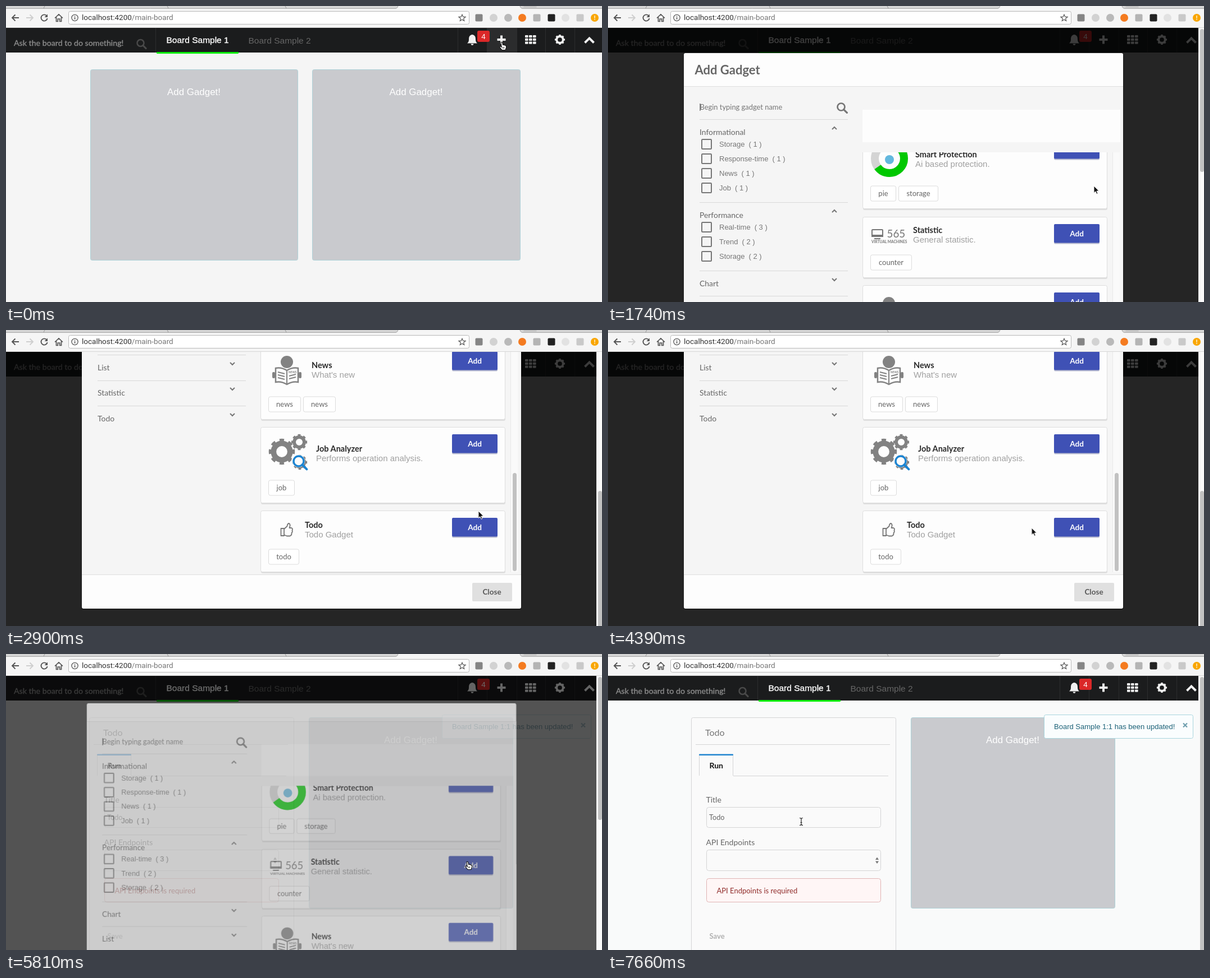
Write an HTML page that moves like this. It is 1061x528 px and loops after 8 s.

```html
<!DOCTYPE html>
<html lang="en">
<head>
<meta charset="utf-8">
<title>Add a gadget to the board</title>
<style>
html, body { margin: 0; width: 100%; height: 100%; overflow: hidden; background: #f5f5f5; }
svg { display: block; width: 1061px; height: 528px; font-family: Lato, "Open Sans", sans-serif; }
text { white-space: pre; }
.helv { font-family: "Liberation Sans", Arial, sans-serif; }
.url { font-family: Roboto, sans-serif; }
.bold { font-weight: 700; }
.mid { text-anchor: middle; }
.semi { stroke: currentColor; stroke-width: .35px; }

.anim { animation: 8s linear infinite; }
.step { animation: 8s step-end infinite; }
.dimmer { animation-name: dim; }
.modal { animation-name: modal; }
.scroll { animation-name: scroll; }
.thumb { animation-name: thumb; }
.body { animation-name: body; }
.before { animation-name: before; }
.after { animation-name: after; }
.hover { animation-name: hover; }
.bar { animation-name: bar; }
.short { animation-name: short; }
.long { animation-name: long; }
.toast { animation-name: toast; }
.cursor { animation-name: move; }
.arrow { animation-name: arrow; }
.hand { animation-name: hand; }
.ibeam { animation-name: ibeam; }

@keyframes dim {
  0%, 8.9% { opacity: 0; }
  13.375% { opacity: .57; }
  16.25%, 70.25% { opacity: 1; }
  72.625% { opacity: .79; }
  78.2%, 100% { opacity: 0; }
}
@keyframes modal {
  0%, 8.9% { opacity: 0; transform: scale(.8); transform-origin: 526px 303px; }
  13.375% { opacity: .45; transform: scale(.927); transform-origin: 526px 303px; }
  17.5% { opacity: 1; transform: none; transform-origin: 526px 303px; }
  70.25% { opacity: 1; transform: scale(1); transform-origin: 526px 264px; }
  72.625% { opacity: .75; transform: scale(.978); transform-origin: 526px 264px; }
  76.4%, 100% { opacity: 0; transform: scale(.9); transform-origin: 526px 264px; }
}
@keyframes scroll {
  0% { transform: translateY(0); }
  23.75% { transform: translateY(0); animation-timing-function: ease-in-out; }
  35.5%, 66.86% { transform: translateY(-473px); }
  66.88%, 100% { transform: translateY(0); }
}
@keyframes thumb {
  0% { transform: translateY(0); }
  23.75% { transform: translateY(0); animation-timing-function: ease-in-out; }
  35.5%, 66.86% { transform: translateY(246px); }
  66.88%, 100% { transform: translateY(0); }
}
@keyframes body { 0% { transform: none; } 66.87%, 100% { transform: translateY(-26.5px); } }
@keyframes before { 0% { opacity: 1; } 66.87%, 100% { opacity: 0; } }
@keyframes after { 0% { opacity: 0; } 66.87%, 100% { opacity: 1; } }
@keyframes hover { 0% { opacity: 1; } 8.9%, 100% { opacity: 0; } }
@keyframes bar { 0% { opacity: 0; } 8.9%, 100% { opacity: 1; } }
@keyframes short { 0% { opacity: 1; } 77.1%, 100% { opacity: 0; } }
@keyframes long { 0% { opacity: 0; } 77.1%, 100% { opacity: 1; } }
@keyframes toast { 0%, 70.25% { opacity: 0; } 72.625% { opacity: .5; } 78%, 100% { opacity: 1; } }
@keyframes move {
  0%, 8% { transform: translate(882px, 64px); }
  9%, 14.9% { transform: translate(883px, 65px); }
  20.6%, 25% { transform: translate(865px, 321px); }
  36%, 38.5% { transform: translate(841px, 323px); }
  40.75%, 44% { transform: translate(841px, 337px); }
  49.4%, 51.6% { transform: translate(686px, 372px); }
  54.875% { transform: translate(754px, 353px); }
  61.4%, 66.87% { transform: translate(821px, 358px); }
  70%, 74% { transform: translate(821px, 370px); }
  83.75%, 87.1% { transform: translate(384px, 335px); }
  95.75%, 100% { transform: translate(344px, 299px); }
}
@keyframes arrow {
  0% { opacity: 0; } 8.9% { opacity: 1; } 40.5% { opacity: 0; } 45.6% { opacity: 1; }
  58.8% { opacity: 0; } 74.5% { opacity: 1; } 93%, 100% { opacity: 0; }
}
@keyframes hand {
  0% { opacity: 1; } 8.9% { opacity: 0; } 40.5% { opacity: 1; } 45.6% { opacity: 0; }
  58.8% { opacity: 1; } 74.5%, 100% { opacity: 0; }
}
@keyframes ibeam { 0% { opacity: 0; } 93%, 100% { opacity: 1; } }
</style>
</head>
<body>
<svg id="stage" viewBox="0 0 1061 528"></svg>
<script>
const GRAY = '#767676';

// y is the vertical centre of the line
const text = (s, x, y, size, fill, cls = '') =>
  `<text x="${x}" y="${y + size * .35}" font-size="${size}" fill="${fill}" color="${fill}" class="${cls}">${s}</text>`;
const rect = (x, y, w, h, fill, extra = '') =>
  `<rect x="${x}" y="${y}" width="${w}" height="${h}" fill="${fill}" ${extra}/>`;
const box = (x, y, w, h, fill, stroke, r = 3) =>
  rect(x + .5, y + .5, w - 1, h - 1, fill, `stroke="${stroke}" rx="${r}"`);
const circle = (x, y, r, fill, extra = '') => `<circle cx="${x}" cy="${y}" r="${r}" fill="${fill}" ${extra}/>`;
const line = (d, stroke, w = 1, extra = '') =>
  `<path d="${d}" fill="none" stroke="${stroke}" stroke-width="${w}" ${extra}/>`;
const shape = (d, fill, extra = '') => `<path d="${d}" fill="${fill}" ${extra}/>`;
const group = (cls, ...parts) => `<g class="${cls}">${parts.join('')}</g>`;
const rule = (x1, x2, y, color) => rect(x1, y, x2 - x1, 1, color);
const chevron = (x, y, dir, r = 4, w = 2, color = GRAY) =>
  line(`M${x - r} ${y + dir * r / 2}l${r} ${-dir * r} ${r} ${dir * r}`, color, w);
const lens = (x, y, r, w, color) =>
  circle(x, y, r, 'none', `stroke="${color}" stroke-width="${w}"`) +
  line(`M${x + r * .7} ${y + r * .7}l${r * .9} ${r * .9}`, color, w * 1.2, 'stroke-linecap="round"');
const gear = (x, y, r, color) =>
  circle(x, y, r * .64, 'none', `stroke="${color}" stroke-width="${r * .42}"`) +
  circle(x, y, r * .88, 'none', `stroke="${color}" stroke-width="${r * .26}" pathLength="16" stroke-dasharray="1" stroke-dashoffset=".5"`);

function browser() {
  const extensions = [[842, '#858585'], [868, '#d2d2d2'], [894, '#b9b9b9'], [919, '#f47b20'], [945, '#b4b4b4'],
    [971, '#222'], [996, '#e2e2e2'], [1022, '#c9c9c9'], [1048, '#f9a602']];
  const squares = [842, 945, 971, 1022];
  return [
    rect(0, 0, 1061, 39, '#f5f5f5'),
    shape('M0 0H698L695 4.5H0Z', '#d5d5d5'),
    shape('M915 0H1061V4.5H918Z', '#d5d5d5'),
    line('M0 4.5H694Q697 4 698 0M915 0Q916 4.5 920 4.5H1061', '#a5a5a5'),
    line('M69 0l-2 4M287 0l2 4M497 0l2 4', '#999'),
    rect(921, 0, 24, 3, '#c4c4c4', 'rx="2"'),
    rect(0, 38, 1061, 1, '#d6d6d6'),
    line('M23 21H11M16.5 15.5L11 21l5.5 5.5', '#555', 1.9),
    line('M36 21H48M42.5 15.5L48 21l-5.5 5.5', '#cfcfcf', 1.9),
    line('M72.5 17.5A5.6 5.6 0 1 0 73.6 22', '#555', 1.9),
    shape('M74 14.5V20H68.5Z', '#555'),
    line('M87 21.5L94 15l7 6.5M89.5 20V27.5H92.3V23H95.7V27.5H98.5V20', '#555', 1.7),
    box(111, 9, 714, 24, '#fff', '#b8b8b8'),
    circle(122.5, 21, 5.6, 'none', 'stroke="#555" stroke-width="1.3"'),
    rect(121.8, 20, 1.5, 4, '#555'), rect(121.8, 17.6, 1.5, 1.5, '#555'),
    text('localhost:4200<tspan fill="#777">/main-board</tspan>', 135, 20.5, 13.5, '#333', 'url'),
    line('M812 15.2l1.7 4 4.3.3-3.3 2.8 1 4.3-3.7-2.3-3.7 2.3 1-4.3-3.3-2.8 4.3-.3Z', '#555', 1.2),
    ...extensions.map(([x, c]) => squares.includes(x) ? rect(x - 6.5, 14.5, 13, 13, c, 'rx="2"') : circle(x, 21, 7, c)),
    text('!', 1048, 21, 11, '#fff', 'bold mid')
  ].join('');
}

function header() {
  const icon = '#f0f0f0';
  const cells = [0, 1, 2].flatMap(r => [0, 1, 2].map(c => rect(924 + c * 7, 52 + r * 5.7, 5.6, 4.3, icon, 'rx=".8"')));
  return [
    rect(0, 39, 1061, 44, '#1b1c1d'),
    group('step hover', rect(857, 39, 52, 44, '#2b2c2d')),
    ...[266, 804, 856, 909, 960, 1012].map(x => rect(x, 39, 1, 44, '#2c2d2e')),
    text('Ask the board to do something!', 14, 66.5, 14.2, '#8b8b8b', 'semi'),
    lens(239.5, 66, 6, 2.5, '#494949'),
    text('Board Sample 1', 285.5, 61, 15.5, '#fff', 'helv semi'),
    text('Board Sample 2', 431.5, 61.5, 15.5, '#666', 'helv'),
    rect(268, 82, 146, 3, '#00f000', 'rx="1"'),
    shape('M830 51C824 52 824 57 824 60Q824 64 821 66.500H839Q836 64 836 60C836 57 836 52 830 51ZM827.500 67.500H832.500Q832 70 830 70T827.500 67.500Z', icon),
    rect(839, 44, 22, 20, '#db2828', 'rx="3"'),
    text('4', 850, 54, 13.5, '#fff', 'helv mid'),
    line('M874.500 60H889.500M882 52.500V67.500', icon, 4),
    ...cells,
    gear(986, 60, 9, icon),
    chevron(1038.500, 61.500, 1, 8, 4, icon)
  ].join('');
}

const slot = (x, w, cx) =>
  box(x, 113, w, 341, '#c9cace', '#aed2d8') + text('Add Gadget!', cx, 153, 16.9, '#fff', 'helv mid');

function todoCard() {
  return [
    rect(0, 83, 1061, 445, '#f9fafa'),
    box(148, 113, 365, 440, '#fafafa', '#d4d5d6'),
    text('Todo', 173, 140, 16, '#777'),
    rule(156, 502, 161, '#d4d4d5'),
    rule(223, 499, 217, '#d4d4d5'),
    line('M162.500 217V180H222.500V217', '#d4d4d5'),
    rect(162, 178.500, 61, 2.5, '#2185d0', 'rx="1"'),
    text('Run', 180.500, 199, 14, '#111', 'bold'),
    text('Title', 174.500, 260.500, 14, '#666'),
    box(175, 273, 311, 37, '#fafafa', '#d4d4d5', 4),
    text('Todo', 180, 291.500, 12.7, '#666'),
    text('API Endpoints', 174.500, 336, 14, '#666'),
    box(175, 349, 311, 38, '#fafafa', '#d4d4d5', 4),
    shape('M476 367l3-4.500 3 4.500ZM476 369.500l3 4.500 3-4.500Z', '#777'),
    box(175, 400, 311, 43, '#fff6f6', '#e0b4b4', 4),
    text('API Endpoints is required', 193.500, 422, 13, '#912d2b'),
    text('Save', 180.500, 503, 13, '#b0b0b0', 'bold'),
    slot(539, 364, 720.500)
  ].join('');
}

function toast() {
  return group('anim toast',
    box(776, 108, 266, 43, '#fafdfe', '#a9d5de'),
    text('Board Sample 1:1 has been updated!', 794, 129, 13, '#1c6278', 'helv'),
    line('M1024 123.500l7 7m0-7l-7 7', '#6f9fae', 2.2));
}

function filters() {
  const option = (y, name, count) =>
    box(166, y - 9, 19, 19, 'none', GRAY, 1) + rect(167.500, y - 7.500, 16, 16, 'none', `stroke="${GRAY}"`) +
    text(`${name}<tspan dx="7">( ${count} )</tspan>`, 198, y + .5, 13, '#777', 'helv');
  const section = (y, name, dir) => text(name, 163, y, 13.9, '#666') + chevron(403, y - 7, dir);
  return [
    text('Begin typing gadget name', 163.500, 180.500, 12.9, GRAY),
    rect(163.500, 174, 1, 13, '#333'),
    lens(415, 180, 6.5, 2.7, GRAY),
    ...[202, 350, 472, 517, 563, 608].map(y => rule(163, 427, y, '#d8d8d8')),
    section(225, 'Informational', 1),
    option(246, 'Storage', 1), option(272, 'Response-time', 1), option(298, 'News', 1), option(324, 'Job', 1),
    section(373, 'Performance', 1),
    option(394, 'Real-time', 3), option(420, 'Trend', 2), option(446, 'Storage', 2),
    section(495, 'Chart', -1), section(540, 'List', -1), section(585, 'Statistic', -1), section(631, 'Todo', -1)
  ].join('');
}

const icons = {
  donut: () =>
    circle(501, 272, 26, 'none', 'stroke="#d4d4d4" stroke-width="14"') +
    circle(501, 272, 26, 'none', 'stroke="#00c800" stroke-width="14" pathLength="100" stroke-dasharray="65 35" transform="rotate(-90 501 272)"') +
    circle(501, 274, 8, '#63b8de'),
  monitor: () =>
    rect(470, 399, 19, 12, 'none', `stroke="${GRAY}" stroke-width="2" rx="1"`) + rect(469, 408, 21, 4, GRAY) +
    rect(474, 414, 11, 2, GRAY) +
    text('565', 496.500, 406.500, 18.800, GRAY) + text('VIRTUAL MACHINES', 469, 420.500, 6.6, GRAY, 'bold'),
  reader: () =>
    circle(500, 530, 11, '#828282') +
    shape('M480 541Q490 539 500 545Q510 539 520 541V566Q510 564 500 570Q490 564 480 566Z', '#fcfcfc', 'stroke="#828282" stroke-width="2.5"') +
    line('M500 545V570M484 548l12 3m-12 2l12 3m-12 2l12 3m8-6l12-3m-12 8l12-3', '#828282', 2) +
    text('NEWS', 510, 548, 5, '#828282', 'bold mid') +
    rect(474, 548, 5, 11, '#828282', 'rx="2"') + rect(521, 548, 5, 11, '#828282', 'rx="2"'),
  gears: () =>
    gear(491, 690, 23, '#828282') + gear(522, 673, 14, '#828282') +
    circle(521, 707, 13, '#fcfcfc') + gear(523, 709, 13, '#828282') +
    circle(521, 707, 11, '#fcfcfc') + lens(521, 707, 9, 3.4, '#1b84d2'),
  thumb: () =>
    line('M489.500 827H495V840H489.500ZM495 828L500.500 823Q501 818 504 818Q507 820 504.500 826H508Q511 827 509.500 830Q510.500 833 508.500 835Q509 839 505.500 840.500H500L495 838.500', GRAY, 1.8, 'stroke-linejoin="round"')
};

function gadget([top, bottom, x, titleY, title, note, icon, tags]) {
  let tagX = 467;
  const chips = tags.map(([name, w]) => {
    const chip = box(tagX, bottom - 41.500, w, 28, '#fff', '#dcdcdc') + text(name, tagX + w / 2, bottom - 27.500, 13, '#666', 'mid');
    tagX += w + 4;
    return chip;
  });
  return [
    rect(454, top + 2, 435, bottom - top, '#dedede', 'rx="3"'),
    box(453, top, 436, bottom - top, '#fdfdfd', '#dedede'),
    icons[icon](),
    text(title, x, titleY, 14.500, '#2a2a2a', 'bold'),
    text(note, x, titleY + 17, 15, '#a0a0a0', 'helv'),
    rect(794, top + 14.500, 81, 34, '#b9bcd0', 'rx="2"'),
    rect(794, top + 13, 81, 33.500, '#3f51b5', 'rx="2"'),
    text('Add', 834.500, top + 30, 13.600, '#fff', 'bold mid'),
    ...chips
  ].join('');
}

const gadgets = [
  [226, 362, 547, 265, 'Smart Protection', 'Ai based protection.', 'donut', [['pie', 46], ['storage', 71]]],
  [376, 485, 543, 400, 'Statistic', 'General statistic.', 'monitor', [['counter', 74]]],
  [498, 633, 544, 536, 'News', "What's new", 'reader', [['news', 58], ['news', 58]]],
  [646, 782, 552, 684.500, 'Job Analyzer', 'Performs operation analysis.', 'gears', [['job', 47]]],
  [795, 905, 532, 821, 'Todo', 'Todo Gadget', 'thumb', [['todo', 55]]]
];

function modal() {
  return group('anim modal', group('anim scroll',
    rect(134, 86, 784, 886, '#000', 'opacity=".25" rx="4"'),
    rect(135, 84, 782, 886, '#fdfdfd', 'rx="3"'),
    group('step before', text('Add Gadget', 154.500, 114, 22, '#666', 'bold')),
    group('step body',
      rect(135, 144, 782, 766, '#f5f5f5'),
      rule(135, 917, 143, '#dedede'),
      filters(),
      rect(453, 185, 459, 58, '#fdfdfd'),
      `<g clip-path="url(#list)">${gadgets.map(gadget).join('')}</g>`,
      rect(898, 261, 13, 644, '#fafafa'), rect(898, 261, 1, 644, '#e8e8e8'),
      rect(902, 728, 7, 175, '#c1c1c1', 'rx="3.5"'),
      rule(135, 917, 909, '#dedede'),
      rect(830, 924, 71, 33, '#e0e0e0', 'rx="2"'),
      text('Close', 865, 940, 13.500, '#5a5a5a', 'bold mid'))));
}

function scrollbar() {
  return group('step bar',
    rect(1051, 39, 10, 489, '#fafafa'),
    group('step short', group('anim thumb', rect(1054, 41, 7, 255, '#c1c1c1', 'rx="3.5"'))),
    group('step long', rect(1054, 41, 7, 492, '#c1c1c1', 'rx="3.5"')));
}

function cursor() {
  return group('anim cursor',
    group('step arrow', shape('M0 0V12.500L2.900 9.800 5 14.400 7 13.500 5 9H9Z', '#111', 'stroke="#fff" stroke-width=".9"')),
    group('step hand', shape('M-1 1Q0-.5 1.500 1L2.500 5.500 4 5 5 6 6.500 5.700 7.500 7 8.500 7V10L7 14.500H1L-3 9.500Q-3.500 7.500-1.500 8L.3 9.500Z', '#fff', 'stroke="#111" stroke-width="1.100"'),
      line('M2.500 9V12M4.500 9V12', '#111', .8)),
    group('step ibeam', line('M-3-6.500Q0-6.500 0-4.500Q0-6.500 3-6.500M0-5V5M-3 6.500Q0 6.500 0 4.500Q0 6.500 3 6.500M-1.500 1.500H1.500', '#222', 1.200)));
}

document.getElementById('stage').innerHTML = [
  '<defs><clipPath id="list"><rect x="450" y="261" width="448" height="646"/></clipPath></defs>',
  rect(0, 0, 1061, 528, '#f5f5f5'),
  group('step before', slot(150, 370, 334.500), slot(545, 371, 730)),
  group('step after', todoCard()),
  header(),
  toast(),
  group('anim dimmer',
    rect(0, 39, 1061, 44, '#000', 'opacity=".75"'),
    rect(0, 83, 1061, 445, '#000', 'opacity=".85"'),
    modal()),
  scrollbar(),
  browser(),
  cursor()
].join('');
</script>
</body>
</html>
```
